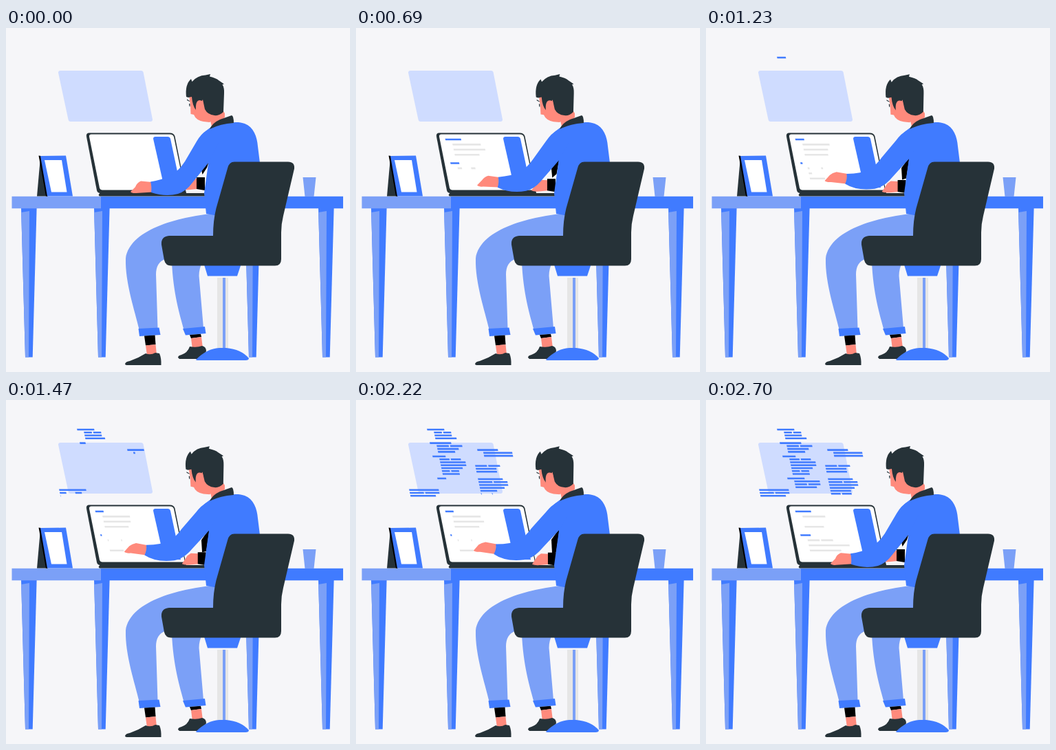
These frames come from a looping animation (500x500 px, 2730 ms). An HTML page:

```html
<!DOCTYPE html>
<html lang="en">
<head>
<meta charset="utf-8">
<title>Coding at a desk</title>
<style>
  html, body { margin: 0; width: 100%; height: 100%; overflow: hidden; background: #f6f6f9; }
  svg { display: block; width: 100vw; height: 100vh; }
  .blue { fill: #407bff; }
  .soft { fill: #7ba0f7; }
  .dark { fill: #263238; }
  .skin { fill: #ff8a7c; }
  .grey { fill: #e6e6e6; }
  .white { fill: #fff; }
</style>
</head>
<body>
<svg viewBox="0 0 500 500">
  <defs>
    <g id="leg">
      <path class="blue" d="M0 262H22.600L16.700 478.500H6z"/>
      <path class="soft" d="M0 262L.3 268 12 266 11 478.500H6z"/>
    </g>
  </defs>

  <path fill="#cfdcff" d="M79 62H196q3 0 3.500 2L213 133q0 3-3 3H94q-3 0-3.500-3L76 65q0-3 3-3z"/>
  <g id="code"></g>

  <use href="#leg" x="22"/><use href="#leg" x="128"/><use href="#leg" x="347"/><use href="#leg" x="454"/>
  <path class="blue" d="M138 244.700H490V262.300H138z"/>
  <path class="soft" d="M8.500 244.700H138V262.300H8.500zM431.500 217H450.500L447.500 245H434.500z"/>

  <path class="dark" d="M50 188L45 244.500H60z"/>
  <path d="M47.500 185.500L51 186 61 244.500H58z"/>
  <path class="blue" d="M50 186L87 185.500 97 244.500H60z"/>
  <path class="white" d="M56 192H81L88.500 238.500H66z"/>

  <path class="dark" d="M121 152.500H238q6 0 7.500 5L262 240H137q-4 0-5-4L117 158q-1-5.500 4-5.500z"/>
  <path class="white" d="M124 154.500H238q5 0 6 4L260 235.500H140q-3 0-4-3L121 158q-.5-3.500 3-3.500z"/>
  <path class="blue" d="M217 158H235q3 0 4 3L254 232H230L214 161q0-3 3-3z"/>
  <g id="screen"></g>
  <path class="dark" d="M137 239.500H289V244.500H136q-3-2 1-5z"/>
  <path fill="#f2f2f4" d="M262 237H289V240H262z"/>

  <g id="farHand">
    <path class="skin" d="M254 234L262 222 267 218.500 278 219V234L268 235Q258 236 254 234z"/>
    <path d="M277 217H289V236L277 234z"/>
  </g>
  <path id="shade"/>

  <path class="soft" d="M241 340C243 385 252 415 259 440L287 436 280.500 360q0-10 5-20z"/>
  <path class="soft" d="M304 269.500C260 273 180 290 174 335C173 370 187 410 194 440L220.500 437 218 358q0-17 13-22L304 310z"/>
  <path class="blue" d="M192.500 437L222.500 435.500 224.500 446 194 448zM257 437L289 434 290.500 444 261 446.500z"/>
  <path d="M201 447.500L216.500 446.500 217.500 460 203 461.500zM267 446L283 444.800 284 449 269 451z"/>
  <path class="skin" d="M203 461.500L217.500 460 219 475 205 476zM269 451L284 449 286 465 271 467z"/>
  <path class="dark" d="M173 489Q173 485 180 484 192 480 203 473 210 476 217 472L223 473Q226 480 225.500 490H175zM250 479q0-3 5-4Q264 472 267 463q10 2 18-1 6 1 6 8L285 478 278 481H252z"/>

  <path class="grey" d="M307 363H323V467H307z"/>
  <path class="soft" d="M315 363H319V467H315z"/>
  <path class="blue" d="M288 344H341.500L336 360.500H293zM276 482Q292 466 310 465H320Q342 467 353 480q0 3-5 3H280q-4 0-4-1z"/>

  <path class="blue" d="M298 144C312 139 335 134 347 139C360 144 365 158 366 172L369 196 320 275 291 270 288 240 295 190 283 157Q290 149 298 144z"/>
  <path class="dark" d="M332 194.500H410q10 0 9 10L403 273q-3 12-3 24V336q0 9.500-9 9.500H240q-8 0-10-8L226 315q-1-12 11-13H301Q301 280 305.500 262L322 204q2-9.500 10-9.500z"/>

  <path class="skin" d="M294 122L314 118 318 124V130L299 143z"/>
  <g id="head">
    <path class="skin" d="M266 98L268 112 268.500 125 273 126Q276 134 287 136L296 137 306 128 300 98z"/>
    <path class="dark" d="M262 100Q260 82 269 74L270.500 78Q278 69 290 68.500L297 67 296 70.500Q306 73 309 76L317 81.500 314.500 82Q317.500 87 317 95L316 122Q310 128 303 127 293 126 289 118L286 104 276 119Q271 113 270 100L265 101z"/>
    <path class="skin" d="M276 120Q275 106 281 105 287 105 287 111 287 117 284 119 280 121 276 120z"/>
    <path class="dark" d="M263 103.500L267 106V107L263 105zM266 110H267.500V114H266.500z"/>
  </g>
  <path class="dark" d="M296 147Q300 138 311 133L328 127Q331 128 331 138 312 139 296 147z"/>

  <path id="hand" class="skin"/>
  <path id="arm" class="blue"/>
</svg>
<script>
const LOOP = 2730, SWING = 910, SLANT = 0.21;
const $ = id => document.getElementById(id);
const clamp = v => Math.max(0, Math.min(1, v));

// Two poses per path; the numbers are blended
const poses = {
  hand: ["M212 224L196 222.500Q190 225 188 231L181 238Q183 240.500 189 240L213 238.500z",
         "M204 209L188 206Q182 207 178 209.500L170.500 218Q173 220.500 180 220L202 223.500z"],
  arm: ["M292 149Q284 153 277 165L260 194Q251 208 238 215 226 221 210 223.500Q212 230 211 239Q232 246 250 241 262 237 270 226L295 195 310 165z",
        "M292 149Q284 153 276 163L255 186Q246 198 238 203 226 209 203 209Q204 216 200 223.500Q216 235 244 232 256 230 266 220L295 189 310 165z"],
  shade: ["M296 190L284 206 285.500 213 292 203z",
          "M296 186L284 203 285 222.500 291 222.500z"]
};
const num = /-?\d+(\.\d+)?/g;
function blend([a, b], k) {
  const to = b.match(num);
  let i = 0;
  return a.replace(num, v => (+v + (to[i++] - v) * k).toFixed(2));
}

// A row of text: one bar, or two with a gap
function addRow(parent, cls, x, y, width, split) {
  const el = document.createElementNS("http://www.w3.org/2000/svg", "path");
  el.setAttribute("class", cls);
  $(parent).append(el);
  const part = (width - 2) / 2;
  const bars = split ? [[x, part], [x + part + 2, part]] : [[x, width]];
  return scale => el.setAttribute("d", scale < 0.01 ? "" : bars.map(([x, w]) =>
    `M${x} ${y - 1.3}h${w * scale}l.6 2.6h${-w * scale}z`).join(""));
}
const rowX = (x, row, gap, indent) => x + row * gap * SLANT + (row ? indent : 0);

// Laptop text: full and shortest width of each row
const spans = [[23, 12], [41, 33], [46, 0], [36, 28], [15, 2], [37, 3], [60, 0], [46, 20]];
const screenRows = spans.map(([full, low], i) => {
  const row = i % 4, second = i > 3;
  const x = rowX(second ? 137 : 129.5, row, 7.4, 9);
  const y = (second ? 196.5 : 162) + row * 7.4;
  return {
    draw: addRow("screen", row ? "grey" : "blue", x, y, full, i === 5),
    start: 120 + i * 100,
    dip: 1 - low / full,
    inverse: row > 0 && !second
  };
});

// Floating code: blocks are [x, y, rows]; widths follow a wave
const streams = [
  { start: 1180, step: 66, indent: 9.2, width: 31, peak: 4.5, split: 1,
    blocks: [[103, 43, 4], [107, 62.6, 4], [111, 82, 7], [118, 114, 4]] },
  { start: 1380, step: 45, indent: 0, width: 37, peak: 0.5, split: 1,
    blocks: [[77, 130.7, 3]] },
  { start: 1390, step: 75, indent: 8, width: 36, peak: 1.5, split: 3,
    blocks: [[176, 72.6, 3]] },
  { start: 1615, step: 75, indent: 0, width: 36, peak: 4.5, split: 0,
    blocks: [[173, 95.8, 3], [177, 115, 6]] }
];
const codeRows = streams.flatMap(s => {
  let i = 0;
  return s.blocks.flatMap(([x, y, rows]) => Array.from({ length: rows }, (_, row) => {
    const shorter = s.indent && !row ? 6 : 0;
    const width = s.width - shorter + 7 * Math.cos((i - s.peak) * Math.PI / 3);
    const draw = addRow("code", "blue", rowX(x, row, 4.25, s.indent), y + row * 4.25, width, i % 4 === s.split);
    return { draw, start: s.start + s.step * i++ };
  }));
});

function draw(t) {
  const k = (1 - Math.cos(2 * Math.PI * t / SWING)) / 2;
  for (const id in poses) $(id).setAttribute("d", blend(poses[id], k));
  $("head").setAttribute("transform", `rotate(${-1.2 * k} 308 130)`);
  $("farHand").setAttribute("transform", `translate(${2 * k} ${5 * k})`);
  for (const r of screenRows) {
    // Rows type in once, then shrink and refill with the arm
    const swing = t > SWING ? clamp((r.inverse ? 1 - k : k) * 1.15) : 0;
    r.draw(clamp((t - r.start) / 200) * (1 - r.dip * swing));
  }
  for (const r of codeRows) r.draw(clamp((t - r.start) / 100));
}

const begin = performance.now();
function tick() {
  draw((performance.now() - begin) % LOOP);
  requestAnimationFrame(tick);
}
tick();
</script>
</body>
</html>
```
